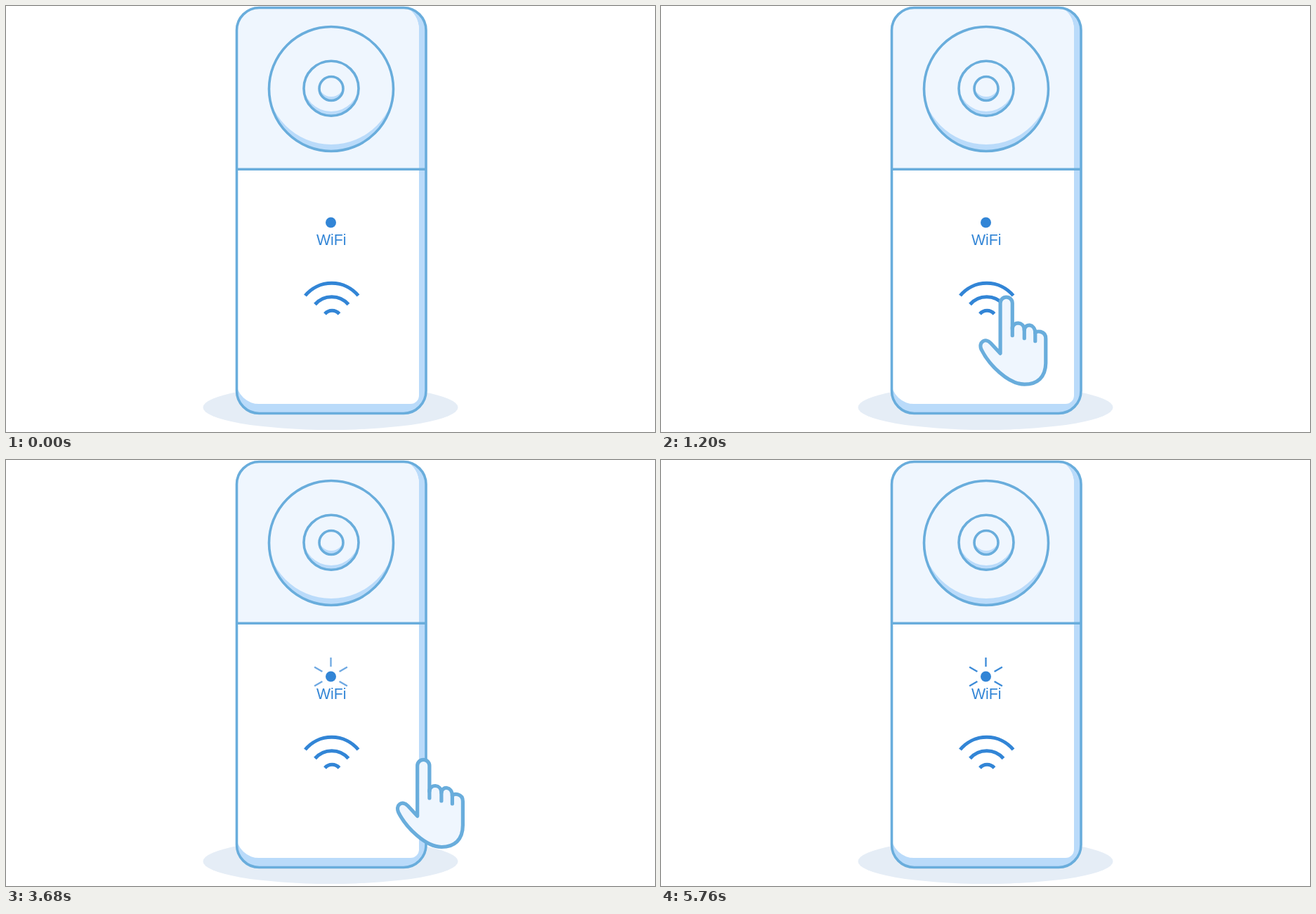
These frames come from a looping animation (924x606 px, 5840 ms). An HTML page:

```html
<!DOCTYPE html>
<html lang="en">
<head>
<meta charset="utf-8">
<title>WiFi pairing</title>
<style>
  html, body { margin: 0; width: 100%; height: 100%; overflow: hidden; background: #fff; }
  svg { display: block; width: 924px; height: 606px; }
  .line { stroke: #69addc; stroke-width: 3.6; fill: none; }
  .light { fill: #eff6fe; }
  .shade { fill: #badbfa; }
  .ink { fill: #3285d6; }
  .wifi { stroke: #3285d6; stroke-width: 5; fill: none; }
  text { font: 21.3px "Liberation Sans", Arial, sans-serif; }
</style>
</head>
<body>
<svg viewBox="0 0 924 606">
  <defs>
    <clipPath id="body"><rect x="328.5" y="2.5" width="269.5" height="577" rx="32"/></clipPath>
    <clipPath id="big"><circle cx="463" cy="118" r="88.5"/></clipPath>
    <clipPath id="mid"><circle cx="463" cy="117.2" r="39"/></clipPath>
    <clipPath id="small"><circle cx="463" cy="117.5" r="17"/></clipPath>
  </defs>

  <ellipse cx="462" cy="571" rx="181.5" ry="32" fill="#e5edf6"/>

  <g clip-path="url(#body)">
    <path class="shade" d="M320 0H610V590H320Z"/>
    <path id="face" fill="#fff" d="M328 0H564C578 4 588 17 588 34V554a12 12 0 0 1 -12 12H362A32 32 0 0 1 328 534Z"/>
    <path class="light" d="M328 0H564C578 4 588 17 588 34V232H328Z"/>
  </g>
  <path class="line" d="M328.5 232.3H598"/>
  <rect class="line" x="328.5" y="2.5" width="269.5" height="577" rx="32"/>

  <g clip-path="url(#big)"><circle class="shade" cx="463" cy="118" r="89"/><circle class="light" cx="463" cy="105" r="92"/></g>
  <circle class="line" cx="463" cy="118" r="88.5"/>
  <g clip-path="url(#mid)"><circle class="shade" cx="463" cy="117" r="40"/><circle class="light" cx="463" cy="110" r="40"/></g>
  <circle class="line" cx="463" cy="117.2" r="39"/>
  <g clip-path="url(#small)"><circle class="shade" cx="463" cy="117" r="18"/><circle class="light" cx="463" cy="111" r="18"/></g>
  <circle class="line" cx="463" cy="117.5" r="17"/>

  <g id="rays" stroke="#3285d6" stroke-width="2.3"></g>
  <circle class="ink" cx="462.5" cy="308" r="7.5"/>
  <text class="ink" x="463.2" y="339.5" text-anchor="middle">WiFi</text>

  <path class="wifi" d="M426 412A49 49 0 0 1 501.500 412"/>
  <path class="wifi" d="M440 424.500A31.500 31.500 0 0 1 487.500 424.500"/>
  <path class="wifi" d="M454 438A13.600 13.600 0 0 1 474.500 438"/>

  <g id="press" fill="#f75252">
    <circle cx="462" cy="414" r="31" opacity=".28"/>
    <circle cx="462.5" cy="414.500" r="17.5" opacity=".36"/>
  </g>

  <g id="hand" class="light" stroke="#69addc" stroke-width="5.2" stroke-linecap="round" stroke-linejoin="round">
    <path d="M592.5 507V435.500a8.600 8.600 0 0 1 17.200 0V472
      C610 461 626.500 461 626.700 474C627 464 642 464 642.200 478C643 474.500 657.200 474 657.200 486
      V520C657.200 541 645 551 627 551C604 551 576 523 565.500 501.500C561 491 571 484 579 492.500Z"/>
    <path fill="none" d="M609.700 470V481.500M626.700 473V485.500M642.200 477V489.500"/>
  </g>
</svg>
<script>
const LOOP = 5840, STEP = 80;
const $ = id => document.getElementById(id);
const ramp = (t, start, length) => Math.min(1, Math.max(0, (t - start) / length));
const ease = u => u * u * (3 - 2 * u);

for (const deg of [-30, 30, -90, 150, 210]) {
  const ray = document.createElementNS("http://www.w3.org/2000/svg", "path");
  ray.setAttribute("d", "M14 0H27");
  ray.setAttribute("transform", `translate(462.5 308) rotate(${deg})`);
  $("rays").append(ray);
}

// Every 500 ms the rays turn on or off over 325 ms.
function blink(t) {
  if (t < 2450) return 0;
  const phase = (t - 2450) % 1000;
  return ramp(phase, 0, 325) - ramp(phase, 500, 325);
}

function draw(t) {
  const reach = ease(ramp(t, 395, 1005)) - ease(ramp(t, 3177, 1005));
  $("hand").setAttribute("transform", `translate(${122 - 258 * reach} ${15 - 31 * reach})`);
  $("hand").setAttribute("opacity", ease(ramp(t, 298, 250)) - ease(ramp(t, 4030, 250)));
  $("press").setAttribute("opacity", ramp(t, 1400, 110) - ramp(t, 2940, 200));
  $("rays").setAttribute("opacity", blink(t));
}

const start = performance.now();
function frame() {
  const t = (performance.now() - start) % LOOP;
  draw(Math.floor(t / STEP) * STEP);
  requestAnimationFrame(frame);
}
frame();
</script>
</body>
</html>
```
